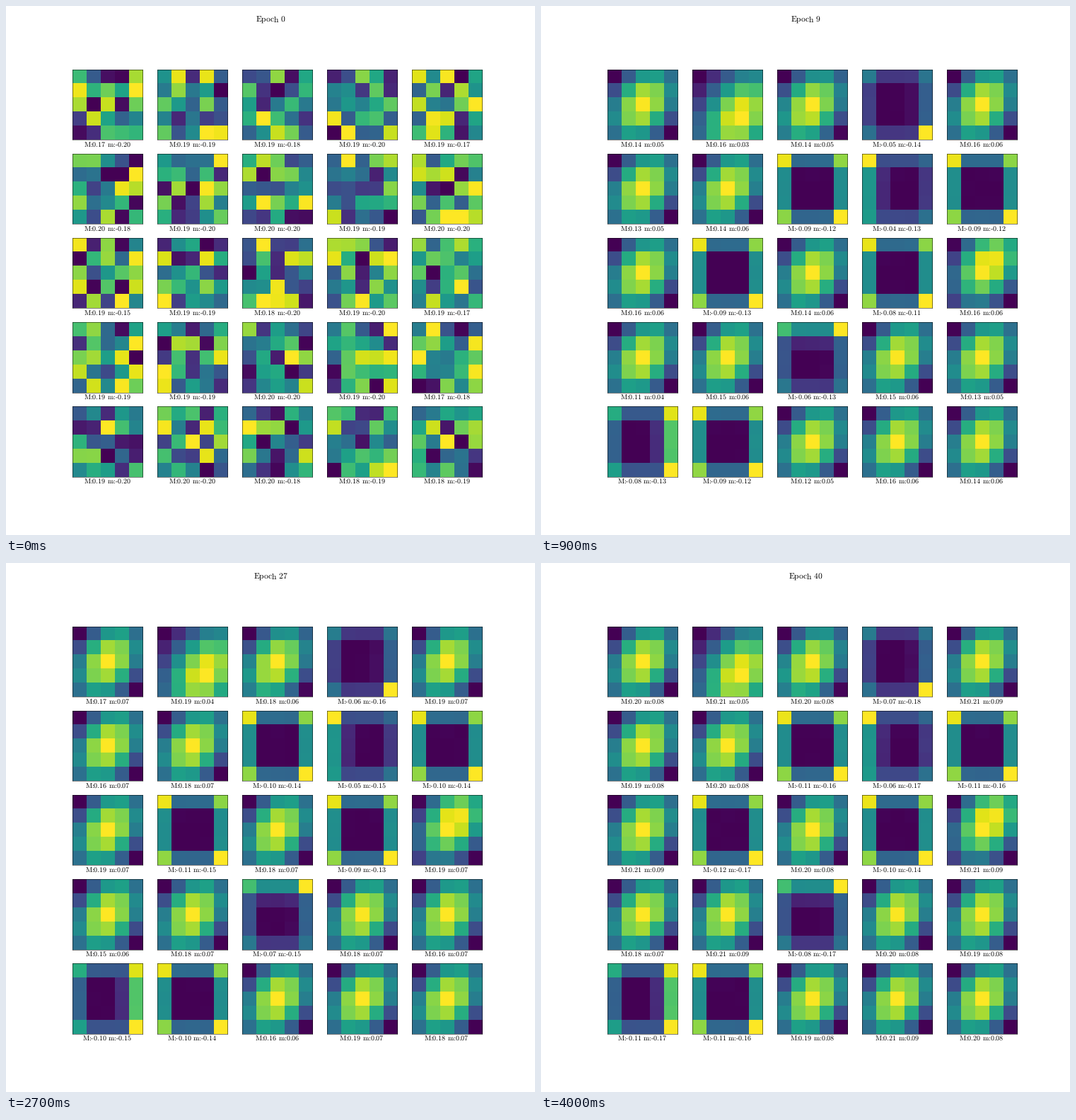
A matplotlib script for the animation above (4100 ms loop, 748x748 px).

```python
import numpy as np
import matplotlib.pyplot as plt
from matplotlib.animation import FuncAnimation

SIZE, DPI, EPOCHS = 748, 72, 41
plt.rcParams.update({"mathtext.fontset": "cm", "text.hinting": "none",
                     "axes.linewidth": .5})


def blob(row, col):
    """Bright hill around (row, col), longer along one diagonal."""
    y, x = np.mgrid[:5, :5] - np.array([row, col]).reshape(2, 1, 1)
    hill = np.exp(-.08 * (x + y) ** 2 - .038 * (x - y) ** 2 - .015 * (x * x - y * y))
    return (hill - hill.min()) / np.ptp(hill)


def dish(edges, corners):
    """Dark middle; edges run top, right, bottom, left, corners from top left."""
    grid = np.zeros((5, 5))
    for edge, opposite, corner in zip(edges, np.roll(edges, 2), corners):
        grid[0, 0] = corner
        grid[0, 1:4] = edge
        grid[1, 1:4] += .3 * max(0, edge - opposite)
        grid = np.rot90(grid)
    return grid


# Sign of the weights, weaker limit relative to the stronger one, shape.
FILTERS = {
    "A": (1, .395, blob(2, 2)),
    "B": (1, .22, blob(2.75, 2.85)),
    "C": (1, .395, blob(1.5, 2.4)),
    "P": (1, .36, blob(2.15, 1.9)),
    "D": (-1, .37, dish((.16, .3, .16, .19), (.42, .38, 1, .37))),
    "E": (-1, .335, dish((.24, .16, .22, .52), (1, .33, .37, .54))),
    "F": (-1, .49, dish((.49, .31, .16, .26), (.7, 1, .38, .4))),
    "G": (-1, .65, dish((.28, .73, .26, .31), (.62, .95, 1, .56))),
    "H": (-1, .72, dish((.35, .49, .33, .49), (.97, .83, 1, .83))),
}
KINDS = "ABPDA" "AAHEH" "AHAHC" "AAFAA" "GHAAA"

# Largest weight of each filter after the last epoch, in thousandths.
STRENGTH = [199, 212, 204, 177, 212,
            194, 204, 158, 168, 158,
            212, 167, 204, 140, 212,
            183, 210, 168, 205, 194,
            167, 158, 187, 212, 204]


def state(panel, epoch):
    """Cells scaled to 0..1 with the largest and smallest weight."""
    rng = np.random.default_rng(100 * epoch + panel)
    if epoch == 0:
        weights = rng.uniform(-.2, .2, (5, 5))
        top, low = weights.max(), weights.min()
        return (weights - low) / (top - low), top, low

    sign, ratio, shape = FILTERS[KINDS[panel]]
    cells = np.clip(shape + rng.uniform(-.006, .006, (5, 5)), 0, 1)
    rise = max(0, (epoch - 9) / 31) ** 1.15
    end = STRENGTH[panel] / 1000
    start = .1555 - 1.4 * (.212 - end) if sign > 0 else .77 * end
    strong = start + (end - start) * rise
    if sign > 0:
        return cells, strong, strong * (ratio - .01 + .02 * rise)
    return cells, -strong * ratio, -strong


def roman(text):
    return rf"$\text{{{text}}}$"


fig, axes = plt.subplots(5, 5, figsize=(SIZE / DPI, SIZE / DPI), dpi=DPI)
fig.subplots_adjust(left=.125, right=.9, bottom=.11, top=.88, wspace=.2, hspace=.2)
title = fig.text(.5, 1 - 23.1 / SIZE, "", size=11.6, ha="center", va="baseline")
images, labels = [], []
for ax in axes.flat:
    ax.set(xticks=[], yticks=[])
    images.append(ax.imshow(np.zeros((5, 5)), cmap="viridis", vmin=0, vmax=1))
    labels.append(ax.text(.5, -10.3 / 99.3, "", size=10, transform=ax.transAxes,
                          ha="center", va="baseline"))


def draw(epoch):
    title.set_text(roman(f"Epoch {epoch}"))
    for panel, (image, label) in enumerate(zip(images, labels)):
        cells, top, low = state(panel, epoch)
        image.set_data(cells)
        label.set_text(roman(f"M:{top:.2f} m:{low:.2f}"))
    return [title, *images, *labels]


anim = FuncAnimation(fig, draw, frames=EPOCHS, interval=100, repeat=True)
plt.show()
```
